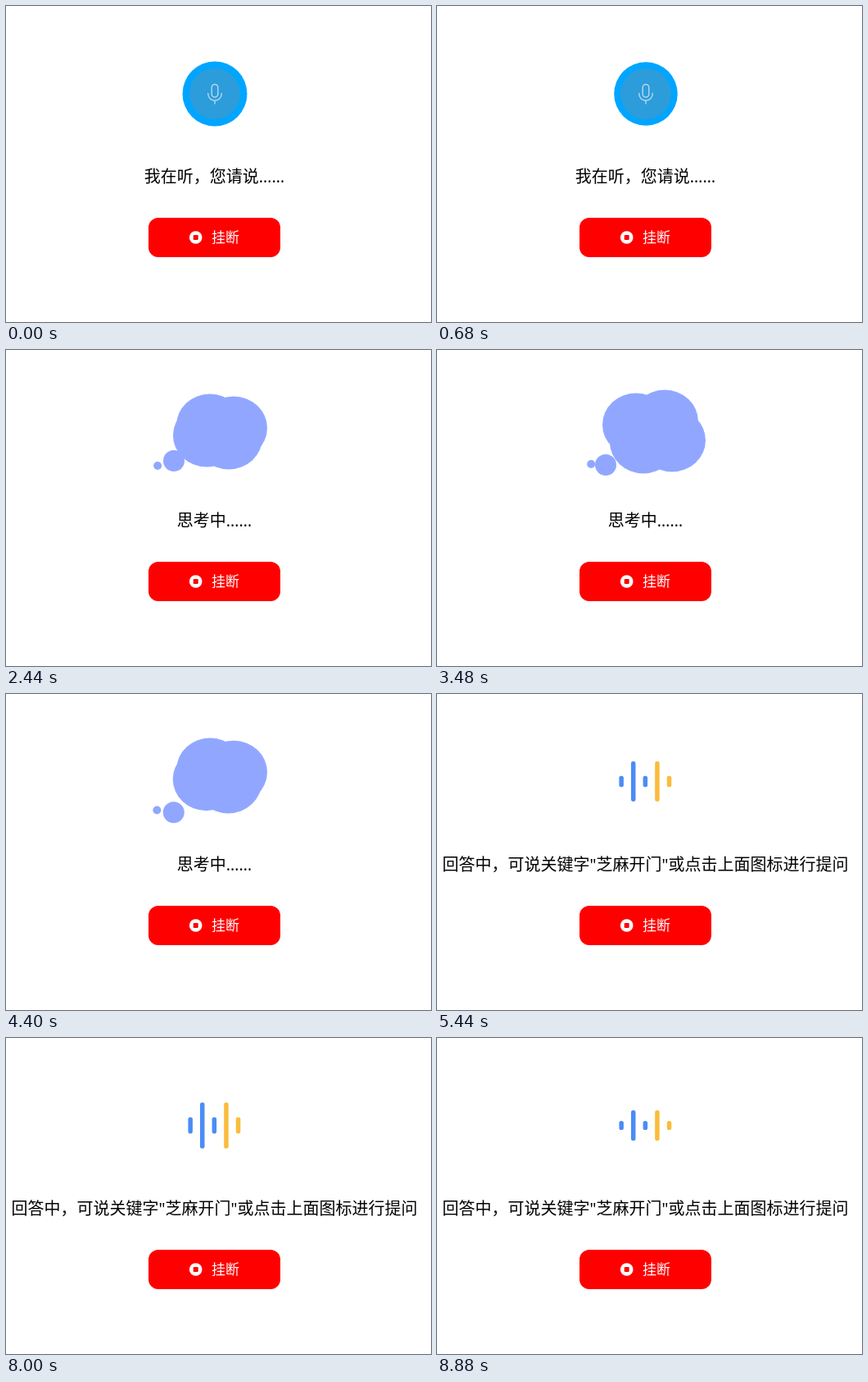
Recreate the animation shown at these times as an HTML page with a canvas. Size 519 by 385 pixels, loop 8920 ms.

```html
<!DOCTYPE html>
<html lang="zh-CN">
<head>
<meta charset="utf-8">
<title>语音对话</title>
<style>
  html, body { margin: 0; width: 519px; height: 385px; overflow: hidden; background: #fff; }
  canvas { display: block; }
</style>
</head>
<body>
<canvas id="stage" width="519" height="385"></canvas>
<script>
const ctx = document.getElementById('stage').getContext('2d');
const LOOP = 8920, THINK_AT = 2120, ANSWER_AT = 4720;
const FONT = '"Open Sans", "Noto Sans CJK SC", "Noto Sans CJK", sans-serif';

// cosine wave with its crest at time `peak`
const wave = (t, period, peak) => Math.cos(2 * Math.PI * (t - peak) / period);

function ellipse(x, y, rx, ry, color) {
  ctx.fillStyle = color;
  ctx.beginPath();
  ctx.ellipse(x, y, rx, ry, 0, 0, 2 * Math.PI);
  ctx.fill();
}

const disc = (x, y, r, color) => ellipse(x, y, r, r, color);

function box(x, y, w, h, r, color) {
  ctx.fillStyle = color;
  ctx.beginPath();
  ctx.roundRect(x, y, w, h, r);
  ctx.fill();
}

function label(text, x, y, size, color, align) {
  ctx.font = `${size}px ${FONT}`;
  ctx.fillStyle = color;
  ctx.textAlign = align;
  ctx.fillText(text, x, y);
}

const caption = text => label(text, 254.5, 215, 20, '#000', 'center');

function microphone() {
  ctx.strokeStyle = '#b5daf1';
  ctx.lineWidth = 1.4;
  ctx.lineCap = 'round';
  ctx.beginPath();
  ctx.roundRect(251.2, 95.5, 7.6, 15.5, 3.8);
  ctx.moveTo(246.7, 106.5);
  ctx.bezierCurveTo(246.7, 118.2, 263.3, 118.2, 263.3, 106.5);
  ctx.moveTo(255, 115.5);
  ctx.lineTo(255, 119);
  ctx.stroke();
}

function listening(t) {
  disc(255, 107, 40.5 + 9.5 * wave(t, 1500, 1100), '#00a5ff');
  disc(255, 107, 31, '#2d9cdb');
  microphone();
  caption('我在听，您请说……');
}

// each lobe: resting place and travel
const LOBES = [
  [249, 92, -6, -1],
  [278, 95, 0, -8],
  [272, 107, 15, 3],
  [245, 104, 7, 8]
];

function thinking(t) {
  const color = '#91a7ff';
  const spread = (wave(t, 2500, 3400) + 0.74) / 1.72;
  for (const [x, y, dx, dy] of LOBES) {
    ellipse(x + dx * spread, y + dy * spread, 41, 38.5, color);
  }
  const sway = wave(t, 2500, 3300);
  disc(205.4 + 0.7 * sway, 139.1 + 5.3 * wave(t, 1250, 3200), 13, color);
  disc(186.3 + 2.1 * sway, 140.2 - 1.4 * sway, 5, color);
  caption('思考中……');
}

function answering(t) {
  const low = 19 + 8 * wave(t, 1200, 1080);
  const high = 42 + 14.6 * wave(t, 1200, 847);
  for (let i = 0; i < 5; i++) {
    const h = i % 2 ? high : low;
    box(222.4 + 14.6 * i, 106.5 - h / 2, 5.5, h, 2.6, i < 3 ? '#4b8cf6' : '#f9bc3c');
  }
  caption('回答中，可说关键字"芝麻开门"或点击上面图标进行提问');
}

function hangUpButton() {
  box(174, 258, 161, 48, 12, '#f00');
  disc(231.7, 282, 7.8, '#fff');
  box(228.7, 279, 6, 6, 1, '#f00');
  label('挂断', 251, 288.3, 17, '#fff', 'left');
}

function draw(now) {
  const t = now % LOOP;
  ctx.fillStyle = '#fff';
  ctx.fillRect(0, 0, 519, 385);
  const scene = t < THINK_AT ? listening : t < ANSWER_AT ? thinking : answering;
  scene(t);
  hangUpButton();
}

const start = performance.now();
function tick() {
  draw(performance.now() - start);
  requestAnimationFrame(tick);
}
tick();
</script>
</body>
</html>
```
